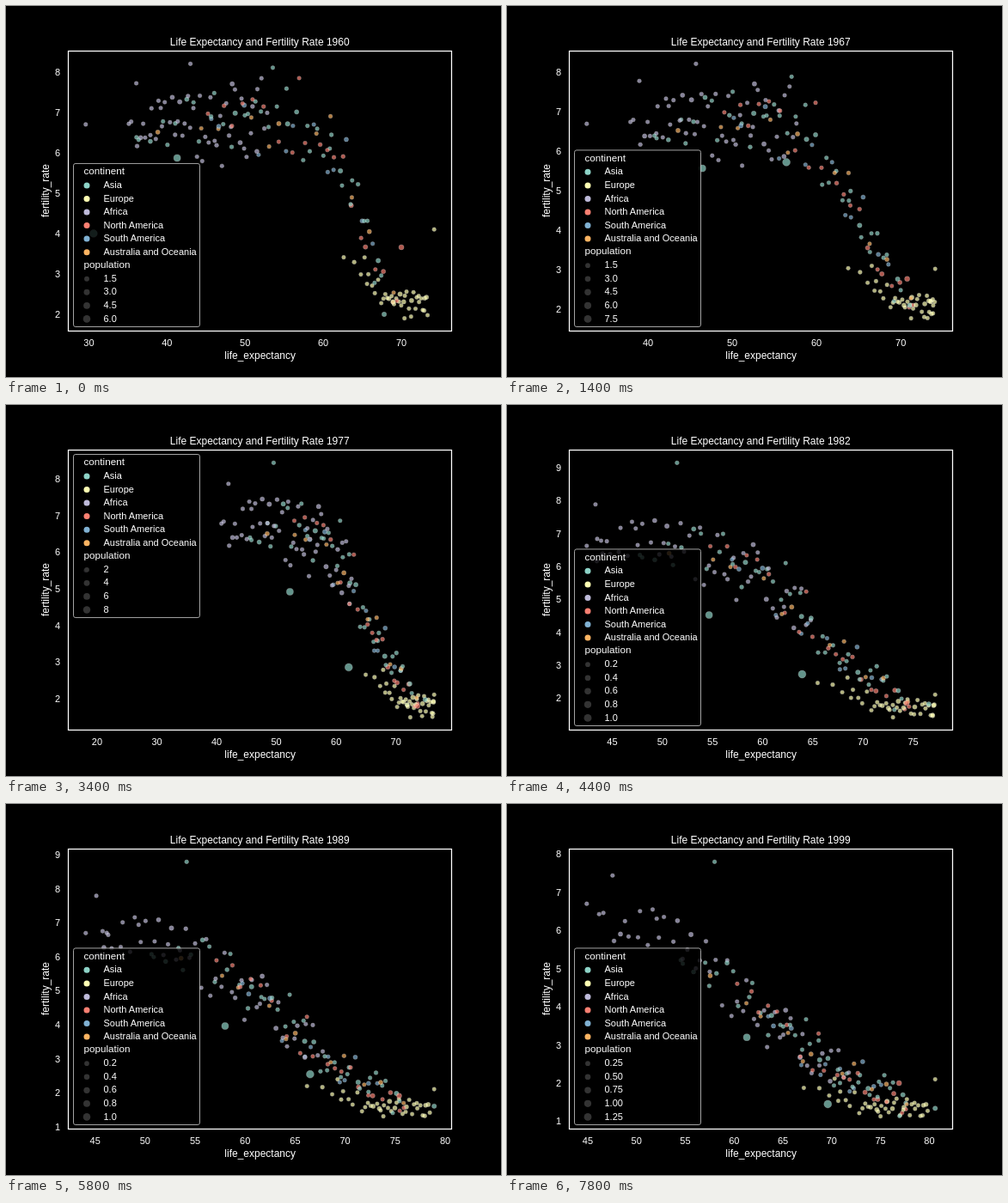
Animation, 576 px wide and 432 px high, one loop 8 s. Source, as an HTML page:

```html
<!DOCTYPE html>
<html lang="en">
<head>
<meta charset="utf-8">
<title>Life Expectancy and Fertility Rate</title>
<style>
  html, body { margin: 0; width: 100%; height: 100%; overflow: hidden; background: #000; }
  svg { display: block; width: 576px; height: 432px; }
  text { font: 11px "Liberation Sans", Arial, sans-serif; fill: #fff; }
  .big { font-size: 12px; }
  .head { font-size: 11.7px; }
  .mid { text-anchor: middle; }
  .end { text-anchor: end; }
</style>
</head>
<body>
<svg id="stage" viewBox="0 0 576 432"></svg>
<script>
const FIRST = 1960, COUNT = 40, STEP_MS = 200;
const BOX = { l: 72.5, t: 52.5, r: 518.5, b: 378.5 };
const ROW = 15.55;

// life: range of life expectancy in the first and the last year
// share: how much of the common fertility curve applies
const GROUPS = [
  { name: "Asia", color: "#8dd3c7", n: 41, skew: .75, share: 1, life: [[34, 68], [53, 78]] },
  { name: "Europe", color: "#ffffb3", n: 38, skew: .6, share: .3, life: [[62.5, 73.5], [67, 80]] },
  { name: "Africa", color: "#bebada", n: 50, skew: 1, share: 1, life: [[35, 53], [46, 72]] },
  { name: "North America", color: "#fb8072", n: 21, skew: .7, share: 1, life: [[42, 70], [58, 78]] },
  { name: "South America", color: "#80b1d3", n: 12, skew: .8, share: 1, life: [[43, 68], [62, 76]] },
  { name: "Australia and Oceania", color: "#fdb462", n: 11, skew: .9, share: 1, life: [[38, 71], [57, 79]] }
];
const [ASIA, EUROPE, AFRICA, NORTH] = GROUPS;

// Data extent per key year: [year, life min, life max, fertility min, fertility max]
const EXTENT = [
  [1960, 29.6, 74.2, 1.9, 8.2], [1964, 30.8, 73.7, 1.82, 8.2], [1971, 35.3, 74.6, 1.7, 8.25],
  [1977, 40, 76.4, 1.48, 8.45], [1982, 43, 77.2, 1.41, 9.15], [1989, 45, 78.9, 1.3, 8.8],
  [1999, 45, 80.6, 1.13, 7.8]
];
// Fertility falls along a logistic curve over life: [year, centre, width, floor, top]
const CURVE = [[1960, 64.5, 2, 2.3, 6.8], [1980, 65, 4, 1.65, 6.9], [1999, 62, 6, 1.25, 6.9]];
// Large countries: [year, life, fertility]
const CHINA = [[1960, 46.5, 6.3], [1971, 62.1, 5.4], [1977, 62.1, 2.85], [1989, 66.5, 2.54], [1999, 69.6, 1.45]];
const INDIA = [[1960, 41.3, 5.87], [1971, 49.4, 5.4], [1989, 58, 3.96], [1999, 61.3, 3.2]];
const USA = [[1960, 70, 3.66], [1971, 71.2, 2.26], [1977, 73.6, 1.79], [1999, 76.9, 2]];
const JAPAN = [[1960, 67.8, 2], [1971, 72.9, 2.15], [1989, 78.9, 1.6], [1999, 80.6, 1.34]];

let seed = 1960;
function rand() {
  seed = (seed * 1664525 + 1013904223) >>> 0;
  return seed / 4294967296;
}
const bell = () => (rand() + rand() + rand() - 1.5) * 2;
const mix = (a, b, k) => a + (b - a) * k;
const dip = (year, centre, width) => Math.exp(-(((year - centre) / width) ** 2));

// Values of a keyed path at a year
function at(path, year) {
  let i = 0;
  while (i < path.length - 2 && year >= path[i + 1][0]) i++;
  const [a, b] = [path[i], path[i + 1]];
  const k = (year - a[0]) / (b[0] - a[0]);
  return a.slice(1).map((v, j) => mix(v, b[j + 1], k));
}

const crowd = GROUPS.flatMap(group => Array.from({ length: group.n }, (_, i) => ({
  group, u: ((i + rand()) / group.n) ** group.skew, v: bell(), pop: .15 * rand() ** 6, order: rand()
}))).sort((a, b) => a.order - b.order);

function bounce(v, lo, hi) {
  if (v < lo) v = 2 * lo - v;
  if (v > hi) v = 2 * hi - v;
  return Math.min(hi, Math.max(lo, v));
}

function extent(year) {
  const [x0, x1, y0, y1] = at(EXTENT, year);
  // Two catastrophes pull the lowest life expectancy down for some years
  const low = x0 - 21.9 * dip(year, 1977, 2.6) - 18 * dip(year, 1993.3, 2.5);
  return { base: x0, low, x1, y0, y1 };
}

function points(year, { base, low, x1, y0, y1 }) {
  const age = (year - FIRST) / (COUNT - 1);
  const [centre, width, floor, top] = at(CURVE, year);
  const list = crowd.map(({ group, u, v, pop }) => {
    const [from, to] = group.life;
    const k = age ** .8;
    const x = mix(mix(from[0], to[0], k), mix(from[1], to[1], k), u);
    const rise = group.share * (top - floor) / (1 + Math.exp((x - centre) / width));
    const y = floor + rise + v * (.2 + .08 * rise);
    return { group, pop, x: bounce(x, base, x1), y: bounce(y, y0, y1) };
  });
  const add = (group, pop, x, y) => list.push({ group, pop, x, y });
  const famine = dip(year, 1960, 2);
  const [cx, cy] = at(CHINA, year);
  add(ASIA, 1, cx - 15.9 * famine, cy - 2.3 * famine);
  add(ASIA, .75, ...at(INDIA, year));
  add(NORTH, .25, ...at(USA, year));
  add(ASIA, .13, ...at(JAPAN, year));
  // The countries at the four ends of the data
  add(AFRICA, .01, low, mix(6.7, 5.5, dip(year, 1977, 3)));
  add(EUROPE, 0, x1, mix(4.1, 2.1, Math.min(1, age * 3)));
  add(EUROPE, .01, mix(70.4, 75, age), y0);
  add(year < 1975 ? AFRICA : ASIA, .01, mix(43, 58, age), y1);
  return list;
}

// Maps a data range onto an axis with a 5% margin at both ends
function axis(lo, hi, from, to) {
  const pad = (hi - lo) * .05, min = lo - pad, max = hi + pad;
  return { min, max, px: v => mix(from, to, (v - min) / (max - min)) };
}

function ticks({ min, max }, step) {
  const list = [];
  for (let v = Math.ceil(min / step) * step; v <= max; v += step) list.push(v);
  return list;
}

const label = (x, y, s, cls = "") => `<text x="${x}" y="${y}" class="${cls}">${s}</text>`;
const dot = (x, y, r, fill, extra = "") =>
  `<circle cx="${x.toFixed(2)}" cy="${y.toFixed(2)}" r="${r.toFixed(2)}" fill="${fill}" ${extra}/>`;
const radius = share => Math.sqrt(18 + 54 * share) / 2 + .2;

function legend(year, onTop) {
  // Largest population, in units of 1e8 and from ten on in 1e9
  const pop = 6.67 + (year - FIRST) * .152;
  const top = pop < 10 ? pop : pop / 10;
  const step = [.2, .25, 1.5, 2].find(s => top / s < 6);
  const n = Math.floor(top / step + 1e-6);
  const digits = (String(step).split(".")[1] || "").length;

  const height = (GROUPS.length + n + 1) * ROW + 19;
  const y0 = onTop ? 57.5 : 373.5 - height;
  let y = y0 + 9.2;
  let out = `<rect x="78.5" y="${y0}" width="147" height="${height}" rx="2.4" fill="#000" stroke="#ccc" opacity=".8"/>`;
  const head = s => { out += label(90.5, y + 3.5, s, "head"); y += ROW; };
  const entry = (s, r, fill) => {
    out += dot(94, y + .7, r, fill) + label(113.5, y + 3.8, s);
    y += ROW;
  };
  head("continent");
  for (const { name, color } of GROUPS) entry(name, 3.5, color);
  head("population");
  for (let i = 1; i <= n; i++) entry((i * step).toFixed(digits), radius(i * step / top), "#333");
  return out;
}

function render(year) {
  const ends = extent(year);
  const ax = axis(ends.low, ends.x1, BOX.l, BOX.r);
  const ay = axis(ends.y0, ends.y1, BOX.b, BOX.t);
  let out = `<rect width="576" height="432"/>`;
  for (const { group, pop, x, y } of points(year, ends)) {
    out += dot(ax.px(x), ay.px(y), radius(pop), group.color, `opacity=".7" stroke="#fff" stroke-width=".34"`);
  }
  out += `<rect x="${BOX.l}" y="${BOX.t}" width="${BOX.r - BOX.l}" height="${BOX.b - BOX.t}" fill="none" stroke="#fff" stroke-width="1.25"/>`;
  const xStep = (ax.max - ax.min) / 5 <= 9 ? 5 : 10;
  for (const v of ticks(ax, xStep)) out += label(ax.px(v), 396, v, "mid");
  for (const v of ticks(ay, 1)) out += label(63, ay.px(v) + 4, v, "end");
  out += label(295.2, 46, `Life Expectancy and Fertility Rate ${year}`, "big mid");
  out += label(295.7, 410.5, "life_expectancy", "big mid");
  out += `<text class="big mid" transform="translate(49.5 215) rotate(-90)">fertility_rate</text>`;
  return out + legend(year, ends.low < 26);
}

const stage = document.getElementById("stage");
let shown = -1;
function tick() {
  const step = Math.floor(performance.now() / STEP_MS) % COUNT;
  if (step !== shown) {
    shown = step;
    stage.innerHTML = render(FIRST + step);
  }
  requestAnimationFrame(tick);
}
tick();
</script>
</body>
</html>
```
